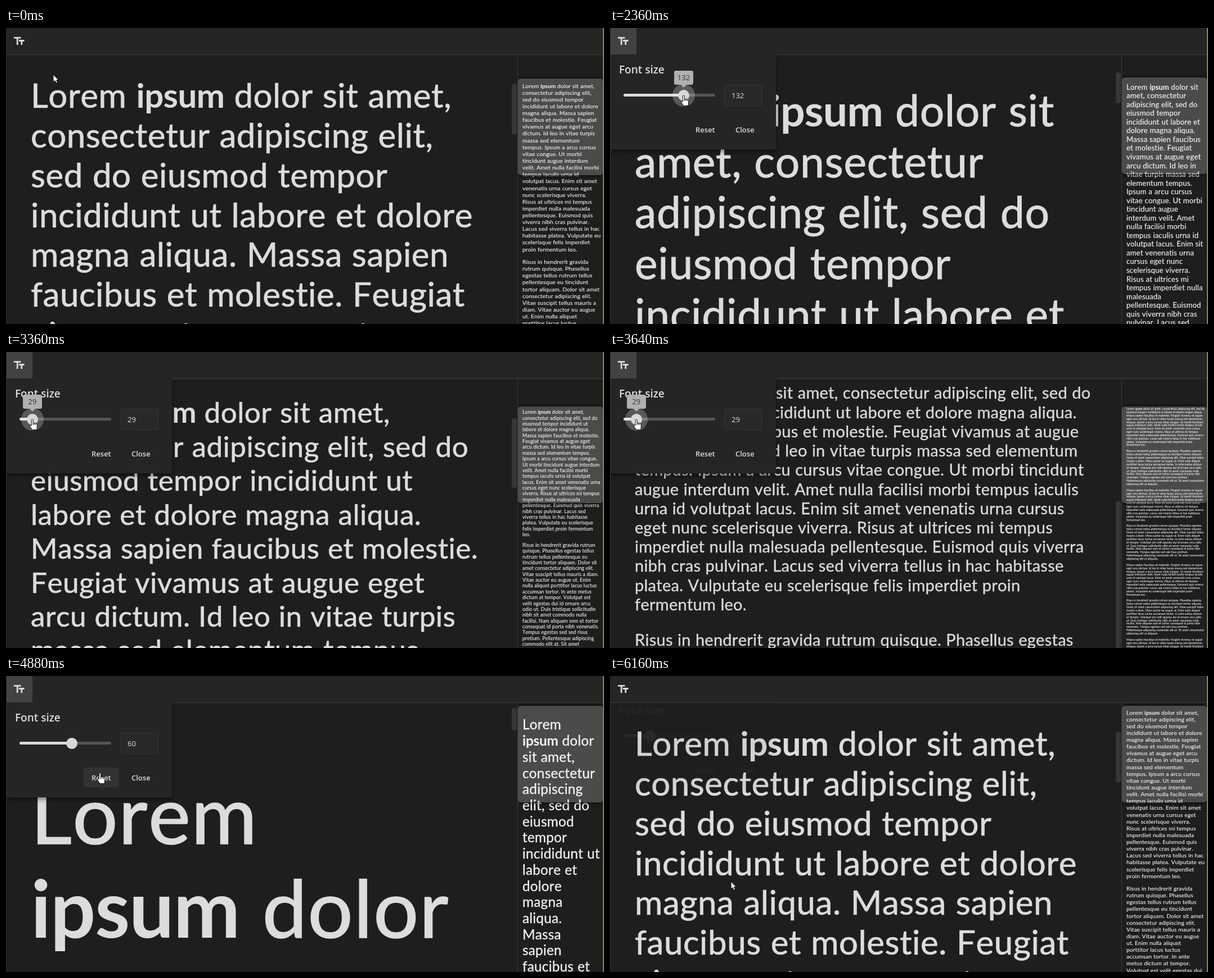
These frames come from a looping animation (1063x527 px, 7.2 s). An HTML page:

```html
<!DOCTYPE html>
<html lang="en">
<head>
<meta charset="utf-8">
<title>Font size</title>
<style>
html, body { margin: 0; width: 100%; height: 100%; overflow: hidden; background: #1e1e1e; }
div, svg { position: absolute; box-sizing: border-box; }
#stage { left: 0; top: 0; width: 1063px; height: 527px; overflow: hidden; background: #1e1e1e; }
#header { width: 1063px; height: 48px; background: #252525; border-bottom: 1px solid #3c3c3c; }
#main { top: 48px; width: 909px; height: 479px; overflow: hidden; }
#side { left: 909px; top: 48px; width: 152px; height: 479px; overflow: hidden; border-left: 1px solid #393939; background: #252525; }
#map { width: 152px; height: 479px; background: #1e1e1e; }
.text { left: 44px; top: -19.5px; width: 812px; color: #dcdcdc; font-family: Lato, sans-serif; line-height: 1.18;
  letter-spacing: .009em; word-spacing: .02em; font-kerning: none; -webkit-text-stroke: .012em; }
.text p { margin: 1em 0; }
.text p:first-child { margin-top: .93em; }
.text b { letter-spacing: -.01em; -webkit-text-stroke: 0; }
#mini { left: 7.5px; top: 0; color: #f4f4f4; transform-origin: 0 0; }
#view { left: 0; width: 151px; height: 172px; border-radius: 5px; background: rgba(255,255,255,.2); box-shadow: 0 0 6px #000; }
#thumb { left: 899px; width: 9px; border-radius: 4px; background: #363636; }
#popup { left: 1px; top: 47px; width: 294px; height: 169px; background: #252525; box-shadow: 0 4px 8px rgba(0,0,0,.45);
  color: #dcdcdc; font: 600 13px/18px "Open Sans", sans-serif; }
#popup div { white-space: nowrap; }
#title { left: 15px; top: 14px; font-size: 19px; line-height: 26px; }
#track, #fill { left: 23px; top: 70px; height: 5px; border-radius: 3px; width: 163px; background: #555; }
#fill { background: #dcdcdc; }
#halo { top: 53px; width: 40px; height: 40px; border-radius: 50%; background: rgba(255,255,255,.24); }
#knob { top: 63px; width: 20px; height: 20px; border-radius: 50%; background: #d8d8d8; }
#tip { top: 29px; width: 34px; height: 25px; border-radius: 3px; background: #b0b0b0; color: #303030;
  font-weight: 400; line-height: 25px; text-align: center; }
#tip::after { content: ""; position: absolute; left: 12px; top: 25px; border: 5px solid transparent; border-top-color: #b0b0b0; border-bottom: 0; }
#field { left: 202px; top: 53px; width: 68px; height: 39px; padding-left: 12px; border: 1px solid #343434; border-radius: 4px;
  background: #292929; font-weight: 400; line-height: 38px; }
#hover { left: 137px; top: 116px; width: 62px; height: 35px; border-radius: 4px; background: #323232; }
#reset, #close { left: 151px; top: 125px; }
#close { left: 222px; }
#button { left: 1px; width: 46px; height: 47px; background: #424242; }
</style>
</head>
<body>
<div id="stage">
  <div id="main"><div class="text" id="copy"></div></div>
  <div id="thumb"></div>
  <div id="side"><div id="map"><div class="text" id="mini"></div><div id="view"></div></div></div>
  <div id="header"></div>
  <div id="popup">
    <div id="title">Font size</div>
    <div id="track"></div><div id="fill"></div><div id="halo"></div><div id="knob"></div><div id="tip"></div>
    <div id="field"></div><div id="hover"></div><div id="reset">Reset</div><div id="close">Close</div>
  </div>
  <div id="button"></div>
  <svg width="1063" height="527" fill="none">
    <path d="M14 17.400H26.500M20.200 17V30M23 22.500H32.500M27.800 22V30" stroke="#dcdcdc" stroke-width="2.800"/>
    <path d="M.5 48V527" stroke="#333"/>
    <path d="M1062 0V527" stroke="#c3ad1c" stroke-width="1.500"/>
    <g id="cursor" fill="#fff" stroke="#111" stroke-linejoin="round">
      <path id="arrow" d="M0 0V13L3 10.500 5 15 7.500 14 5.500 9.500H9.500Z"/>
      <path id="hand" d="M-1.500 2Q0-1 1.500 2V7L7.500 8.300Q9 9 8.800 11L8 19.500H0L-4.500 13Q-5 10-1.500 12ZM1.500 7V11M4 7.500V11M6.500 8V11"/>
    </g>
  </svg>
</div>
<script>
const LOOP = 7200, STEP = 40, MAP_SCALE = 0.1713, TEXT_LAG = 240;
const $ = id => document.getElementById(id);

const opening = "Lorem <b>ipsum</b> dolor sit amet, consectetur adipiscing elit, sed do eiusmod tempor incididunt ut labore et dolore magna aliqua. ";
const first = "Massa sapien faucibus et molestie. Feugiat vivamus at augue eget arcu dictum. Id leo in vitae turpis massa sed elementum tempus. Ipsum a arcu cursus vitae congue. Ut morbi tincidunt augue interdum velit. Amet nulla facilisi morbi tempus iaculis urna id volutpat lacus. Enim sit amet venenatis urna cursus eget nunc scelerisque viverra. Risus at ultrices mi tempus imperdiet nulla malesuada pellentesque. Euismod quis viverra nibh cras pulvinar. Lacus sed viverra tellus in hac habitasse platea. Vulputate eu scelerisque felis imperdiet proin fermentum leo.";
const second = "Risus in hendrerit gravida rutrum quisque. Phasellus egestas tellus rutrum tellus pellentesque eu tincidunt tortor aliquam. Dolor sit amet consectetur adipiscing elit. Vitae suscipit tellus mauris a diam. Vitae auctor eu augue ut. Enim nulla aliquet porttitor lacus luctus accumsan tortor. In ante metus dictum at tempor. Volutpat est velit egestas dui id ornare arcu odio ut. Duis tristique sollicitudin nibh sit amet commodo nulla facilisi. Nam aliquam sem et tortor consequat id porta nibh venenatis. Tempus egestas sed sed risus pretium. Pellentesque adipiscing commodo elit at. Sit amet consectetur adipiscing elit ut aliquam.";
$("copy").innerHTML = $("mini").innerHTML = `<p>${opening}` + `${first}</p><p>${second}</p><p>`.repeat(4);

const ease = p => {
  p = Math.min(1, Math.max(0, p));
  return p * p * (3 - 2 * p);
};
// Starts at a value and eases through moves of [begin, end, target].
const glide = (t, start, ...moves) =>
  moves.reduce((v, [begin, end, target]) => v + (target - v) * ease((t - begin) / (end - begin)), start);

const dragged = t => glide(t, 60, [2010, 2360, 132], [2840, 3240, 29], [3716, 3960, 151], [4080, 4160, 142]);
const fontSize = t => t < 4880 ? dragged(t) : 60;

const show = (id, on) => $(id).style.display = on ? "" : "none";
const place = (id, props) => {
  for (const key in props) $(id).style[key] = props[key] + "px";
};

function drawText(t) {
  const size = fontSize(t - TEXT_LAG);
  place("copy", { fontSize: size });
  place("mini", { fontSize: size });
  place("thumb", { top: 48 + 183000 / size ** 2, height: Math.max(40, 327000 / size ** 2) });

  const top = glide(t, 42.4, [1800, 2360, 40], [2840, 3360, 49], [3716, 3960, 41], [4400, 4440, 4.5]);
  place("view", { top });
  $("mini").style.transform = `translateY(${top - 19.5 * MAP_SCALE}px) scale(${MAP_SCALE})`;
  place("map", { top: t >= 4000 && t < 4200 ? 71 : 0 });
}

function drawPopup(t, knob) {
  const shown = glide(t, 0, [1080, 1280, 1], [5960, 6160, .05]);
  const dragging = t >= 1760 && t < 4440;
  $("popup").style.opacity = shown;
  $("popup").style.transform = `translateY(${-14 * (1 - shown)}px)`;
  place("fill", { width: knob - 23 });
  place("knob", { left: knob - 10 });
  place("halo", { left: knob - 20 });
  place("tip", { left: knob - 17 });
  $("tip").textContent = $("field").textContent = Math.round(fontSize(t));
  show("halo", dragging);
  show("tip", dragging);
  show("button", t >= 1040 && t < 6080);
}

function drawCursor(t, knob) {
  const x = t < 1760
    ? glide(t, 84, [40, 160, 104], [160, 480, 13], [1040, 1080, 20], [1480, 1760, 73])
    : glide(t, knob + 1, [4400, 4720, 167], [5200, 5680, 215]);
  const y = glide(t, 83, [40, 160, 93], [160, 480, 22], [1480, 1760, 119], [4400, 4720, 172], [5200, 5680, 366]);
  const overReset = t >= 4640 && y < 198;
  const hand = (t >= 1040 && t < 1520) || (t >= 1720 && t < 4440) || overReset;
  show("hover", overReset);
  show("hand", hand);
  show("arrow", !hand);
  $("cursor").setAttribute("transform", `translate(${x} ${y})`);
}

function draw(t) {
  const knob = 22 + .818 * glide(t, dragged(t), [4840, 4945, 60]);
  drawText(t);
  drawPopup(t, knob);
  drawCursor(t, knob);
}

let last = -1;
function frame() {
  const t = Math.floor(performance.now() % LOOP / STEP) * STEP;
  if (t !== last) draw(last = t);
  requestAnimationFrame(frame);
}
frame();
</script>
</body>
</html>
```
